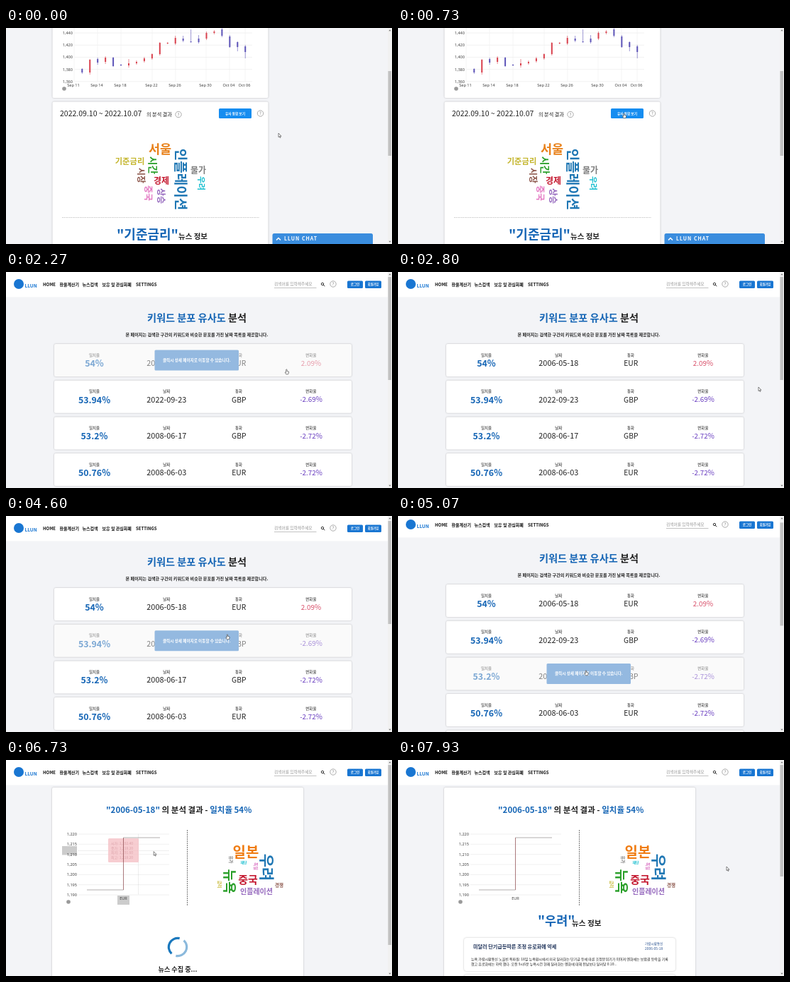
Recreate the animation shown at these times as an HTML page. Size 544x306 px, loop 8000 ms.

```html
<!DOCTYPE html>
<html>
<head>
<meta charset="utf-8">
<style>
html, body { margin: 0; width: 100%; height: 100%; overflow: hidden; background: #f3f4f7; }
svg { display: block; width: 544px; height: 306px; font-family: 'Noto Sans CJK KR', 'Noto Sans CJK JP', 'Noto Sans', sans-serif; }
.axis { font-family: 'Open Sans', sans-serif; }
.card { fill: #fff; filter: drop-shadow(0 .6px .9px rgba(0, 0, 0, .25)); }
</style>
</head>
<body>
<svg id="stage" viewBox="0 0 544 306"></svg>
<script>
const LOOP = 8000, BLUE = '#1565b5', BUTTON = '#1976d2', INK = '#222';

// y is the vertical middle of the glyphs
const text = (x, y, size, str, fill = INK, weight = 500, anchor = 'middle', extra = '') =>
  `<text x="${x}" y="${y + size * .37}" font-size="${size}px" fill="${fill}" font-weight="${weight}" text-anchor="${anchor}" ${extra}>${str}</text>`;
const left = (x, y, size, str, fill, weight) => text(x, y, size, str, fill, weight, 'start');
const axis = (x, y, str, anchor) => text(x, y, 5.6, str, '#333', 400, anchor, 'class="axis"');
const rect = (x, y, w, h, fill, extra = '') => `<rect x="${x}" y="${y}" width="${w}" height="${h}" fill="${fill}" ${extra}/>`;
const card = (x, y, w, h, r = 2) => `<rect class="card" x="${x}" y="${y}" width="${w}" height="${h}" rx="${r}"/>`;
const path = (d, stroke, width = 1, extra = '') => `<path d="${d}" fill="none" stroke="${stroke}" stroke-width="${width}" ${extra}/>`;
const dot = (x, y, r, fill) => `<circle cx="${x}" cy="${y}" r="${r}" fill="${fill}"/>`;
const group = (id, body) => `<g id="${id}">${body}</g>`;
const help = (x, y) => `<circle cx="${x}" cy="${y}" r="4.2" fill="none" stroke="#888" stroke-width=".7"/>` + text(x, y, 6, '?', '#777');
const cloud = words => words.map(([str, x, y, size, fill, turned]) =>
  text(x, y, size, str, fill, 700, 'middle', turned ? `transform="rotate(90 ${x} ${y})"` : '')).join('');

const scrollbar = (top, bottom, id = '') => rect(538, 0, 6, 306, '#f1f1f1') +
  `<path d="M539.3 4.3l1.7-2 1.7 2zM539.3 301.7l1.7 2 1.7-2z" fill="#777"/>` +
  rect(538.5, top, 4.5, bottom - top, '#c1c1c1', id && `id="${id}"`);

const header = (shift = 0) => rect(0, 0, 544, 35.5, '#fff') +
  dot(18, 17, 7, BUTTON) + left(26.5, 20, 6.6, 'LLUN', BUTTON, 700) +
  [[52, 'HOME'], [75.5, '환율계산기'], [107.5, '뉴스검색'], [135.5, '보유 및 관심화폐'], [183, 'SETTINGS']]
    .map(([x, s]) => left(x, 17.5, 6, s, '#111', 700)).join('') +
  `<g transform="translate(${shift})">` +
  left(378, 17, 5.7, '검색어를 입력해주세요', '#999', 400) + path('M378 22.5H437.5', '#999', .6) +
  path('M447.2 18.2l2 2', '#222', 1) + `<circle cx="446" cy="17" r="1.7" fill="none" stroke="#222" stroke-width=".9"/>` +
  help(461, 17) +
  rect(481, 12.5, 22, 10.5, BUTTON, 'rx="1.5"') + text(492, 17.7, 4.5, '로그인', '#fff', 700) +
  rect(506, 12.5, 23, 10.5, BUTTON, 'rx="1.5"') + text(517.5, 17.7, 4.2, '회원가입', '#fff', 700) + '</g>';

// Report page: candles are [top, bottom, wick top, wick bottom, rising]
const CANDLES = [[58, 63, 57, 65, 0], [45, 63, 44, 66, 1], [44, 49, 42, 52, 0], [42, 48, 40, 51, 1], [42, 54, 41, 55, 0],
  [52, 53, 51, 54, 0], [50, 53, 44, 56, 1], [48, 50, 46, 52, 1], [43, 47, 41, 49, 1], [37, 43, 36, 45, 1], [21, 37, 20, 39, 1],
  [21, 22, 20, 23, 1], [14, 22, 11, 24, 1], [15, 18, 11, 20, 0], [19, 20, 2, 21, 0], [15, 20, 10, 22, 0], [7, 15, 5, 17, 1],
  [5, 7, 3, 9, 1], [2, 11, 0, 13, 0], [12, 27, 10, 28, 0], [20, 27, 19, 33, 0], [26, 34, 24, 43, 0]];
const DATES = [['Sep 11', 95], ['Sep 14', 128], ['Sep 18', 161], ['Sep 22', 205], ['Sep 26', 238], ['Sep 30', 281], ['Oct 04', 314], ['Oct 06', 336]];

const report = card(65.5, -10, 304, 109) + card(65.5, 104.5, 304, 220) +
  [1440, 1420, 1400, 1380, 1360].map((v, i) => {
    const y = 7 + i * 17.2;
    return path(`M97 ${y}H347`, '#e8e8e8', .6) + axis(94, y, '1,' + (v - 1000), 'end');
  }).join('') +
  DATES.map(([s, x]) => path(`M${x + 1} 0V76`, '#eee', .6) + axis(x, 80.5, s)).join('') +
  CANDLES.map(([top, bottom, high, low, rising], i) => {
    const x = 107.3 + i * 10.95, color = rising ? '#d9434f' : '#5e55b8';
    return path(`M${x} ${high}V${low}`, color, .6) + rect(x - 1, top, 2, bottom - top, color);
  }).join('') +
  dot(82, 86, 2.8, '#999') +
  left(76, 121.5, 10.5, '2022.09.10 ~ 2022.10.07') + left(198, 122.5, 7.1, '의 분석 결과') + help(243, 122.5) +
  rect(300, 114, 46, 14, '#168df0', 'rx="1.5"') + text(323, 121.2, 4.7, '유사 통합 보기', '#fff', 700) + help(358.5, 121) +
  cloud([['서울', 217, 172, 17.5, '#e8811a'], ['기준금리', 174.5, 189, 11.3, '#c4b52c'], ['시간', 207, 194.5, 13.8, '#2ca02c', 1],
    ['인플레이션', 246, 214.5, 19, '#1f77b4', 1], ['물가', 271, 202, 12, '#7f7f7f'], ['우려', 275, 220, 11, '#17becf', 1],
    ['시장', 190, 209, 12, '#8c564b', 1], ['경제', 219, 217, 12, '#c4182f'], ['중국', 200, 234, 12, '#e377c2', 1], ['상승', 218, 238, 12, '#9467bd', 1]]) +
  path('M79 268.5H357', '#bbb', .8, 'stroke-dasharray="1.5 1"') +
  left(156, 292.5, 18, '"기준금리"', BLUE, 700) + left(243, 295, 10.5, '뉴스 정보', INK, 700) +
  rect(375.5, 291, 141.5, 20, '#3a8dde', 'rx="2.5"') + path('M381 300.5l3-3 3 3', '#fff', 1.5) +
  text(392, 298.7, 7, 'LLUN CHAT', '#fff', 700, 'start', 'letter-spacing="1"') + scrollbar(61, 181);

// Loading page
const BARS = [10, 17, 35, 42.5, 24, 42.5, 35, 17, 10];
const loading = header(5.5) + BARS.map((h, i) => rect(204.3 + i * 14.45, 171.5 - h, 7, h, '#2380cf', 'class="bar"')).join('') +
  text(177.5, 185, 12.5, '', '#111', 700, 'start', 'id="typed"');

// Result list
const ROWS = [['54%', '2006-05-18', 'EUR', '2.09%'], ['53.94%', '2022-09-23', 'GBP', '-2.69%'], ['53.2%', '2008-06-17', 'GBP', '-2.72%'],
  ['50.76%', '2008-06-03', 'EUR', '-2.72%'], ['50.1%', '2008-05-29', 'EUR', '-1.84%']];
const rowTop = i => 102 + i * 51.7;
const row = ([match, date, currency, change], i) => {
  const y = rowTop(i);
  return card(68, y, 419, 46) + '<g class="row">' +
    ['일치율', '날짜', '통화', '변화율'].map((s, c) => text(124.5 + c * 101.8, y + 15.5, 5.5, s)).join('') +
    text(124.5, y + 27.3, 12.4, match, BLUE, 700) + text(226.3, y + 27, 10.9, date) + text(328.3, y + 27, 10.3, currency) +
    text(430, y + 27, 9.9, change, change[0] === '-' ? '#6a3fc0' : '#d8506a') + '</g><g class="tip">' +
    rect(209.5, y + 60 - 0 - 0.2 - 51.3, 118.5, 29, '#94b9e0', 'rx="1.5"') +
    text(268.8, y + 23, 5.6, '클릭시 상세 페이지로 이동할 수 있습니다.', '#fff', 700) + '</g>';
};
const results = group('page', header() +
  text(269, 65, 14.2, `<tspan fill="${BLUE}">키워드 분포 유사도</tspan> 분석`, INK, 700) +
  text(269, 88.7, 6.1, '본 페이지는 검색한 구간의 키워드와 비슷한 분포를 가진 날짜 목록을 제공합니다.', '#222', 700) +
  ROWS.map(row).join('')) + scrollbar(7, 153, 'thumb');

// Detail page
const spinner = (x, y, r, width) => `<g transform="translate(${x} ${y})"><g class="spin">` +
  path(`M${-.35 * r} ${.94 * r}A${r} ${r} 0 0 1 ${-.17 * r} ${-.98 * r}`, '#1a78bd', width) +
  path(`M${.35 * r} ${-.94 * r}A${r} ${r} 0 0 1 ${.17 * r} ${.98 * r}`, '#8bb9dc', width) + '</g></g>';

const detail = header() + card(65, 39, 354, 290) +
  left(141, 71, 11.5, `<tspan fill="${BLUE}">"2006-05-18"</tspan> 의 분석 결과 - <tspan fill="${BLUE}">일치율 54%</tspan>`, INK, 700) +
  group('guides', rect(79, 122, 21, 12.5, '#ccc') + rect(157, 192, 17, 13, '#ccc') +
    path('M102 128.5H230M186.5 105V191', '#bbb', .5, 'stroke-dasharray="1 1"')) +
  [...Array(7).keys()].map(i => {
    const y = 105 + i * 14.35;
    return path(`M102 ${y}H230`, '#e6e6e6', .6) + axis(100, y, '1,' + (220 - i * 5), 'end');
  }).join('') +
  path('M114 184H165.5M165.5 110H217', '#a09a9a', .8) + path('M165.5 110V184', '#96585c', .8) +
  axis(165.5, 196, 'EUR') + dot(88, 201, 2.8, '#999') + path('M255.5 99V206', '#555', .8, 'stroke-dasharray="2 1"') +
  group('quote', rect(144, 111, 43, 34, '#f5bcc2', 'rx="1.5" opacity=".75"') +
    ['시가: 1,192.40', '종가: 1,218.20', '최저: 1,191.60', '최고: 1,218.20'].map((s, i) => left(148, 118 + i * 6.8, 5, s, '#dca3aa', 400)).join('') +
    path('M165.5 111V145', '#96585c', .8)) +
  group('wordsWait', spinner(338, 128, 6.2, 2) + text(338, 143.5, 4.5, '키워드 추출 중...')) +
  group('newsWait', spinner(242, 265, 12.7, 3.2) + text(242, 297, 9.1, '뉴스 수집 중...', INK, 700) + scrollbar(7, 262)) +
  group('words', cloud([['일본', 338, 131, 20, '#f07d14'], ['우려', 368, 152, 21, '#1f77b4', 1], ['중국', 341, 169.5, 15, '#c4182f'],
    ['뉴욕', 315, 172, 19, '#2ca02c', 1], ['인플레이션', 353, 186, 10, '#9467bd'], ['경쟁', 385, 178, 6.5, '#8c564b'],
    ['유가', 317, 141, 5.8, '#777', 1], ['독일', 352, 150.5, 6, '#d86fc0', 1], ['재단', 335, 145.5, 5, '#17becf'], ['금리', 301, 176, 5.8, '#c4b52c', 1]])) +
  group('news', left(197, 228, 17.5, '"우려"', BLUE, 700) + left(245, 231, 10.6, '뉴스 정보', INK, 700) +
    card(93, 252, 298, 47, 4) + card(93, 304, 298, 47, 4) +
    left(106, 264, 7.1, '미달러 단기급등따른 조정 유로화에 약세', '#1d3158', 700) +
    left(348, 260.5, 4.6, '가람시황통신', '#27508f') + left(348, 267, 4.9, '2006-05-18', '#27508f') +
    left(103, 282, 5, '뉴욕 가람시황통신 노을빈 특파원: 18일 뉴욕환시에서 미국 달러화는 단기급 등에 따른 조정분위기가 이어져 엔화에는 보합권 등락을 기록') +
    left(103, 289.5, 5, '했고 유로화에는 하락 했다. 오전 9시6분 뉴욕시간 현재 달러화는 엔화에 대해 전날보다 달러당 0.10...') + scrollbar(7, 165));

const pointer = group('cursor',
  '<path id="arrow" d="M0 0V5.6L1.3 4.5 2.2 6.5 3.1 6.1 2.2 4.2H4Z" fill="#fff" stroke="#333" stroke-width=".6"/>' +
  '<path id="hand" d="M-.7 .2Q0-.6 .6 .2V2.4L3 3V5L2.2 6.8H-.6L-2.2 4.2-1.6 3.5-.7 4.3Z" fill="#fff" stroke="#333" stroke-width=".6"/>');

const $ = id => document.getElementById(id), all = sel => [...document.querySelectorAll(sel)];
$('stage').innerHTML = rect(0, 0, 544, 306, '#f3f4f7') + group('report', report) + group('loading', loading) +
  group('results', results) + group('detail', detail) + pointer;
const bars = all('.bar'), rows = all('.row'), tips = all('.tip'), spins = all('.spin');
const show = (el, on) => el.style.display = on ? '' : 'none';

// Eased interpolation through [time, ...values]
function along(keys, t) {
  const next = keys.findIndex(k => k[0] > t);
  if (next < 0) return keys[keys.length - 1].slice(1);
  const a = keys[Math.max(next - 1, 0)], b = keys[next];
  const p = a === b ? 0 : (t - a[0]) / (b[0] - a[0]), e = p * p * (3 - 2 * p);
  return a.slice(1).map((v, i) => v + (b[i + 1] - v) * e);
}
const CURSOR = [[70, 384, 149], [730, 318.5, 121], [2070, 318.5, 121], [2530, 508, 163], [2800, 508, 163], [3330, 312, 168],
  [4600, 312, 168], [5050, 265, 219], [5090, 265, 219], [5400, 189, 129], [5670, 188.5, 128], [6600, 188.5, 128], [7400, 463, 151]];
const SCROLL = [[4870, 0], [5000, 5], [5100, 5], [5250, 0]];

function draw(t) {
  const scene = t < 1200 ? 'report' : t < 2070 ? 'loading' : t < 5470 ? 'results' : 'detail';
  for (const id of ['report', 'loading', 'results', 'detail']) show($(id), id === scene);

  const [x, y] = along(CURSOR, t), [scroll] = along(SCROLL, t);
  $('page').setAttribute('transform', `translate(0 ${-scroll})`);
  $('thumb').setAttribute('y', 7 + scroll * .48);
  let onRow = false;
  rows.forEach((el, i) => {
    const top = rowTop(i) - scroll, hover = x > 68 && x < 487 && y > top && y < top + 46;
    el.style.opacity = hover ? .55 : 1;
    el.previousSibling.style.fill = hover ? '#fafafa' : '#fff';
    show(tips[i], hover);
    onRow ||= hover;
  });

  bars.forEach((el, i) => {
    const h = BARS[i] * (1 + .12 * Math.sin((t - 1730) / 130) * (i % 2 ? 1 : -1));
    el.setAttribute('height', h);
    el.setAttribute('y', 171.5 - h);
  });
  $('typed').textContent = 'L$UN'.slice(0, Math.max(0, Math.floor((t - 1270) / 150)));

  const onChart = x > 102 && x < 230 && y > 100 && y < 191;
  show($('guides'), onChart);
  show($('quote'), onChart);
  show($('words'), t >= 6600);
  show($('wordsWait'), t < 6600);
  show($('news'), t >= 7000);
  show($('newsWait'), t < 7000);
  spins.forEach(el => el.setAttribute('transform', `rotate(${(t - 5670) * .36})`));

  const pointing = scene === 'results' && onRow || scene === 'report' && x < 346 && y < 128;
  show($('hand'), pointing);
  show($('arrow'), !pointing);
  $('cursor').setAttribute('transform', `translate(${x} ${y})`);
}

const start = performance.now();
function tick() {
  draw((performance.now() - start) % LOOP);
  requestAnimationFrame(tick);
}
tick();
</script>
</body>
</html>
```
